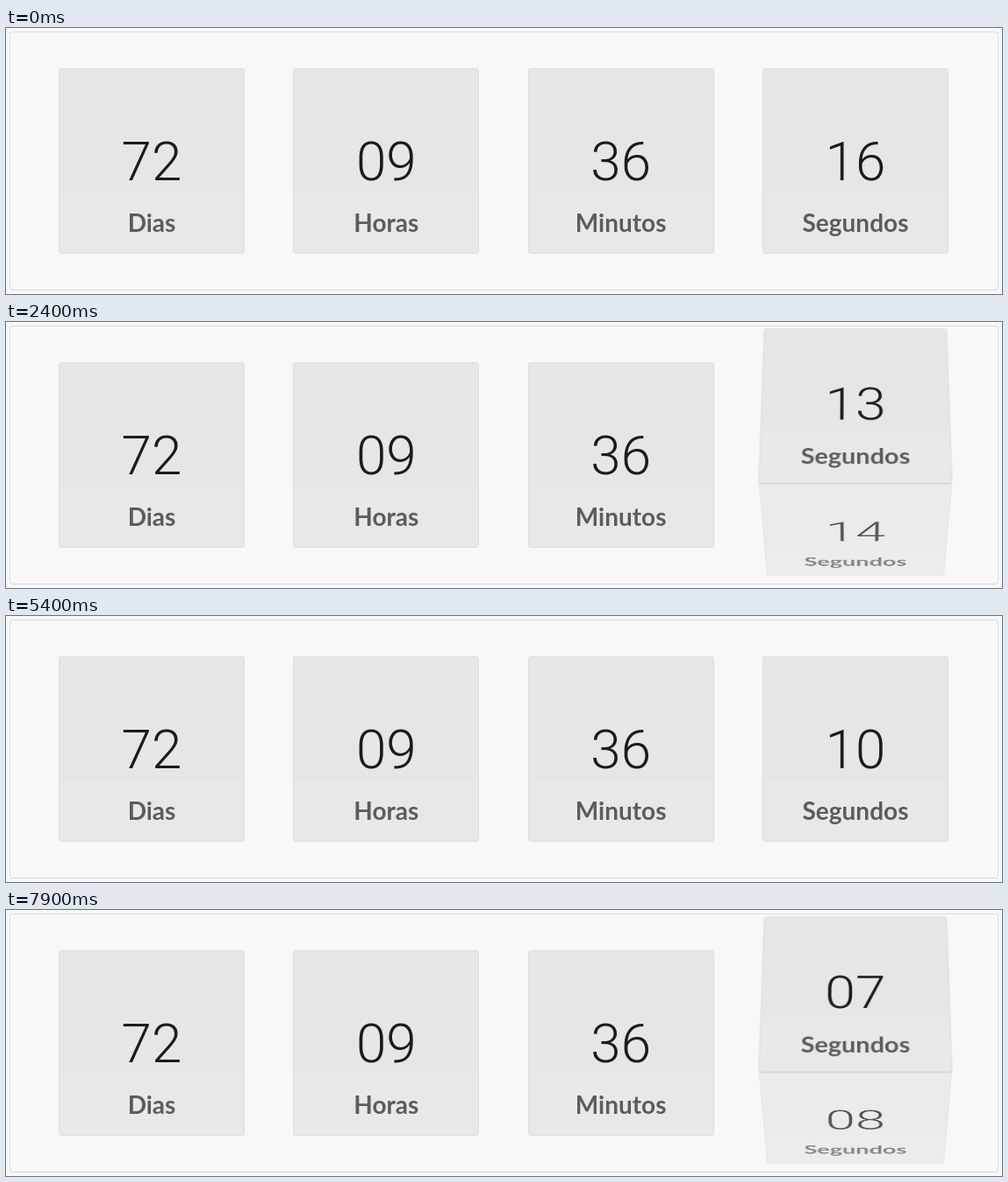
An HTML page that plays this animation: 1135 px wide and 304 px high, repeating every 8000 ms.

```html
<!DOCTYPE html>
<html lang="pt">
<head>
<meta charset="utf-8">
<title>Contagem regressiva</title>
<style>
html, body { margin: 0; width: 100%; height: 100%; overflow: hidden; background: #f8f8f8; }
.panel {
  position: absolute; left: 4px; top: 4px; width: 1127px; height: 296px; box-sizing: border-box;
  border: 1px solid #dedede; border-bottom-color: #d6d6d6; border-radius: 4px; background: #f8f8f8;
}
.slot {
  position: absolute; top: 46px; width: 212px; height: 212px;
  perspective: 2000px; perspective-origin: 50% 71px;
}
.face {
  position: absolute; inset: 0; box-sizing: border-box;
  border: 1px solid #dedede; border-radius: 3px;
  background: linear-gradient(#e6e6e6 141px, #e8e8e8 141px);
  text-align: center; backface-visibility: hidden;
}
.num, .label { position: absolute; left: -1px; width: 212px; }
.num { top: -1px; font: 300 62px/214px Roboto, sans-serif; color: #1b1b1b; }
.label { top: 140px; font: 700 28px/71px Lato, sans-serif; color: #5c5c5c; }
.in { transform-origin: 50% 100%; }
.out { transform-origin: 50% 0; }
.turning .in { box-shadow: 0 1px 2px rgba(34, 36, 38, .15); }
</style>
</head>
<body>
<div class="panel"></div>
<script>
const LOOP = 8000, FIRST = 250, TICK = 916.5, LENGTH = 560;
const SIDE = 212, START = 16, FADE = 0.42;

const pad = n => String(n).padStart(2, '0');

function add(parent, cls, text = '') {
  const el = document.createElement('div');
  el.className = cls;
  el.textContent = text;
  return parent.appendChild(el);
}

function addFace(slot, side, value, label) {
  const face = add(slot, 'face ' + side);
  const num = add(face, 'num', pad(value));
  add(face, 'label', label);
  return { style: face.style, num };
}

function addSlot(i) {
  const slot = add(document.body, 'slot');
  slot.style.left = 60 + i * 802 / 3 + 'px';
  return slot;
}

[[72, 'Dias'], [9, 'Horas'], [36, 'Minutos']]
  .forEach(([value, label], i) => addFace(addSlot(i), 'in', value, label));

const seconds = addSlot(3);
const prev = addFace(seconds, 'out', START, 'Segundos');
const next = addFace(seconds, 'in', START, 'Segundos');

const ease = u => u < 0.5 ? 2 * u * u : 1 - 2 * (1 - u) * (1 - u);

function setText(el, text) {
  if (el.textContent !== text) el.textContent = text;
}

function draw(t) {
  const k = Math.floor((t - FIRST) / TICK);
  const since = t - FIRST - k * TICK;
  const turning = k >= 0 && since < LENGTH;
  setText(next.num, pad(START - 1 - k));
  setText(prev.num, pad(START - k));
  prev.style.display = turning ? '' : 'none';
  seconds.classList.toggle('turning', turning);
  if (!turning) {
    next.style.transform = 'none';
    return;
  }
  const q = ease(since / LENGTH);
  const a = q * Math.PI / 2;
  // height of the shared edge as the cube turns about its centre
  const p = (1 + Math.sin(a) - Math.cos(a)) / 2;
  // the cube stays lifted for half the turn, then settles
  const z = SIDE * Math.min(0.5, 1 - p);
  const pose = (y, angle) => `translate3d(0, ${y}px, ${z}px) rotateX(${angle}deg)`;
  next.style.transform = pose(-SIDE * (1 - p), 90 * (1 - q));
  prev.style.transform = pose(SIDE * p, -90 * q);
  prev.style.opacity = 1 - FADE * q;
}

function frame() {
  draw(performance.now() % LOOP);
  requestAnimationFrame(frame);
}
frame();
</script>
</body>
</html>
```
